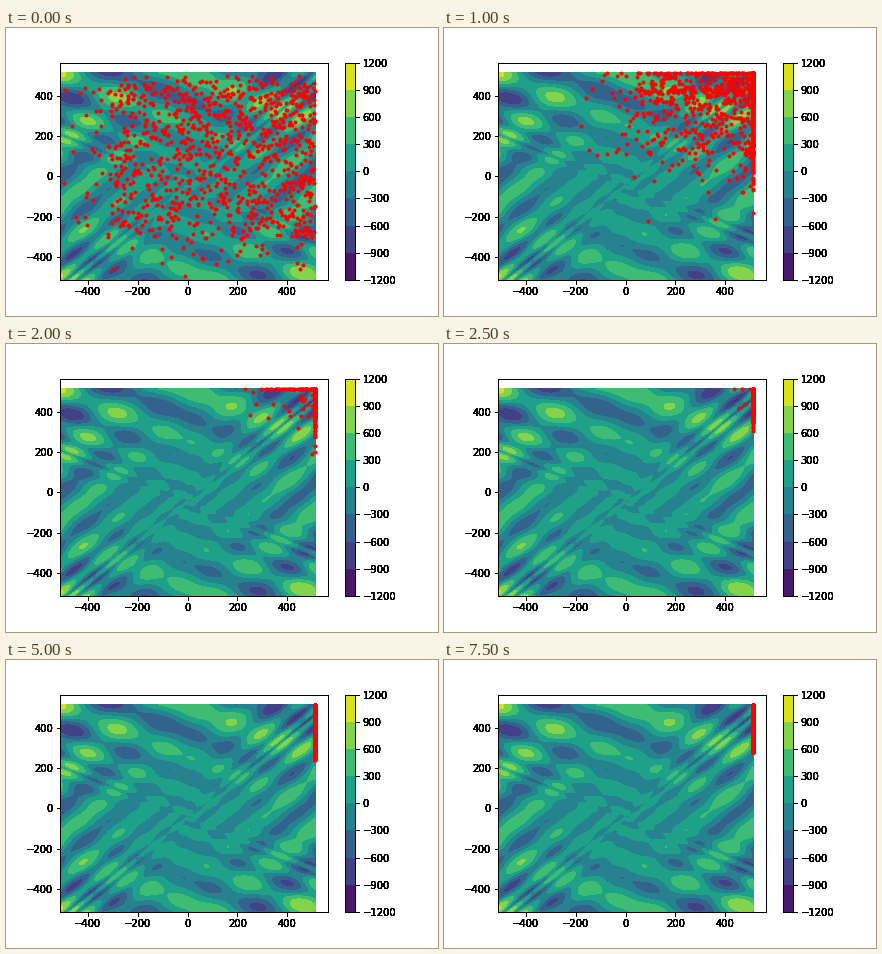
Recreate the animation shown at these times as a matplotlib script. Size 432x288 px, loop 8000 ms.

```python
import numpy as np
import matplotlib.pyplot as plt
from matplotlib.animation import FuncAnimation

LIM, PAD = 512, 51.2
FRAMES, STEP_MS = 16, 500
COUNT = 1000
SETTLED = 7             # step at which all particles sit on the right edge
VMAX = 0.2 * 2 * LIM
GOAL = np.array([LIM, 420.0])
PULL = 0.9
LEVELS = np.arange(-1200, 1201, 300)
TICKS = np.arange(-400, 401, 200)


def eggholder(x, y):
    y = y + 47
    return -y * np.sin(np.sqrt(abs(x / 2 + y))) - x * np.sin(np.sqrt(abs(x - y)))


def swarm():
    """Particle swarm with capped speed, drawn to GOAL and held in the square."""
    rng = np.random.default_rng(7)
    pos = rng.uniform(-LIM, LIM, (COUNT, 2))
    vel = np.zeros_like(pos)
    eager = rng.random((COUNT, 1)) ** 0.25
    path = []
    for k in range(SETTLED):
        inertia = min(0.4 * k, 1) if k < 2 else 1
        push = PULL * eager * rng.random(pos.shape) * (GOAL - pos)
        vel = np.clip(inertia * vel + push, -VMAX, VMAX)
        pos = np.clip(pos + vel, -LIM, LIM)
        path.append(pos)
    # The settled column sways at its lower end
    for j in range(FRAMES - SETTLED):
        low = 262 + 42 * np.cos(np.pi * j / 4) * np.exp(-j / 8)
        y = np.linspace(low, LIM, COUNT)
        path.append(np.column_stack([np.full(COUNT, LIM), y]))
    return path


def frame_axes(rect, xlim, ylim, xticks, yticks, right=False):
    ax = fig.add_axes(rect, facecolor="none", xlim=xlim, ylim=ylim)
    ax.set_xticks(xticks)
    ax.set_yticks(yticks)
    if right:
        ax.yaxis.tick_right()
    return ax


plt.rcParams.update({"font.family": "DejaVu Sans", "font.size": 10})
fig = plt.figure(figsize=(6, 4), dpi=72, facecolor="white")

left, bottom, width, height = 0.125, 0.125, 0.775, 0.755
main = ([left, bottom, 0.8 * width, height],
        (-LIM, LIM + PAD), (-LIM, LIM + PAD), TICKS, TICKS)
bar = ([left + 0.85 * width, bottom, height * 4 / 20 / 6, height],
       (0, 1), (LEVELS[0], LEVELS[-1]), [], LEVELS, True)

ax = frame_axes(*main)
grid = np.arange(-LIM, LIM + 1, 4)
X, Y = np.meshgrid(grid, grid)
field = ax.contourf(X, Y, eggholder(X, Y), levels=LEVELS)
ax.set(xlim=main[1], ylim=main[2])
dots, = ax.plot([], [], "r.", markersize=6)

cax = fig.add_axes(bar[0])
fig.colorbar(field, cax=cax, ticks=LEVELS)

# Repeated overlays give the heavy black lettering and frames
for _ in range(8):
    frame_axes(*main)
    frame_axes(*bar)

path = swarm()


def draw(k):
    dots.set_data(*path[k].T)
    return dots,


anim = FuncAnimation(fig, draw, frames=FRAMES, interval=STEP_MS, repeat=True)
plt.show()
```
